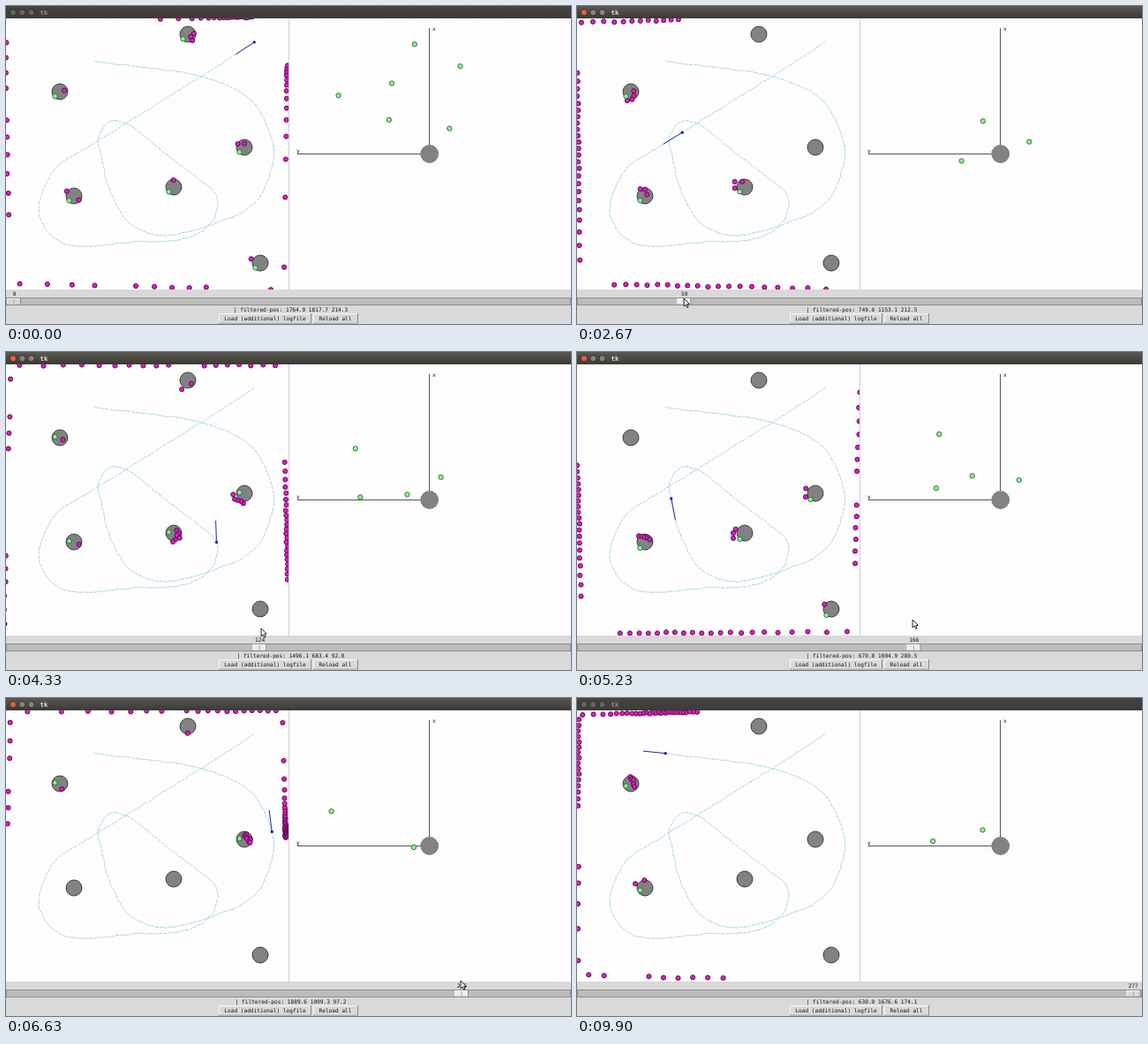
Recreate the animation shown at these times as an HTML page with a canvas. Size 640x360 px, loop 9.93 s.

```html
<!DOCTYPE html>
<html lang="en">
<head>
<meta charset="utf-8">
<title>tk</title>
<style>
  html, body { margin: 0; width: 640px; height: 360px; overflow: hidden; background: #d9d9d9; }
  canvas { display: block; }
</style>
</head>
<body>
<canvas id="stage" width="640" height="360"></canvas>
<script>
const ctx = document.getElementById('stage').getContext('2d');
const LOOP = 9930;
const MONO = '"DejaVu Sans Mono", "Liberation Mono", monospace';
const PANEL = '#d9d9d9', STONE = '#828282', INK = '#111';

// Pixels per millimetre in the world view; the robot view has its own
const SX = 0.1596, SY = 0.1538;
const toX = mm => mm * SX - 0.3, toY = mm => 320.5 - mm * SY;

// Known poses (time, step, x mm, y mm, heading) and pixels passed on the way to the next
const legs = [
  { at: 1500, step: 0, pose: [1764, 1817.7, 214.3], via: [[222, 79]] },
  { at: 2670, step: 50, pose: [749, 1153.1, 212.5], via: [[92, 160], [55, 185], [37, 231], [56, 264], [90, 272],
    [145, 267], [200, 264], [232, 246]] },
  { at: 4330, step: 124, pose: [1496.1, 683.4, 92], via: [[213, 192], [178, 165], [143, 137], [119, 130], [105, 148]] },
  { at: 5230, step: 166, pose: [670.8, 1004.9, 280.5], via: [[119, 212], [142, 247], [180, 260], [234, 247],
    [279, 226], [299, 190]] },
  { at: 6630, step: 226, pose: [1889.6, 1099.3, 97.2], via: [[276, 105], [222, 80], [160, 70]] },
  { at: 8000, step: 277, pose: [630, 1676.6, 174.1], via: [] }
];
const pillars = [[206, 32], [61, 97], [270, 160], [77, 215], [190, 205], [288, 291]];
const pointerKeys = [[60, 645, 356], [1150, 9, 333], [1500, 9, 333], [2670, 121, 331], [5230, 380, 303],
  [6630, 515, 320], [8900, 628, 317], [9300, 270, 136], [9530, 95, 192], [9870, 95, 192]];

const mix = (a, b, u) => a + (b - a) * u;
const clamp = (v, lo, hi) => Math.min(hi, Math.max(lo, v));
const noise = (a, b) => { const s = Math.sin(a * 12.9898 + b * 78.233) * 43758.5453; return (s - Math.floor(s)) * 2 - 1; };
const blend = (a, b, u) => a.map((v, n) => mix(v, b[n], u));
const rad = deg => deg * Math.PI / 180;

// Interval of a rising list that holds v, and how far through it
function locate(list, v) {
  let k = 0;
  while (k < list.length - 2 && v >= list[k + 1]) k++;
  return { k, u: clamp((v - list[k]) / (list[k + 1] - list[k]), 0, 1) };
}
const times = legs.map(l => l.at), steps = legs.map(l => l.step);

function stepAt(t) {
  const { k, u } = locate(times, t);
  return Math.round(mix(steps[k], steps[k + 1], u));
}

// Smooth track through all points, with running length
const knots = [], legKnot = [];
for (const { pose, via } of legs) {
  legKnot.push(knots.length);
  knots.push([toX(pose[0]), toY(pose[1])], ...via);
}
const FINE = 12, track = [];
for (let n = 0; n <= (knots.length - 1) * FINE; n++) {
  const k = Math.min(Math.floor(n / FINE), knots.length - 2), u = n / FINE - k;
  const [p, q, r, s] = [-1, 0, 1, 2].map(d => knots[clamp(k + d, 0, knots.length - 1)]);
  track.push([0, 1].map(c => q[c] + 0.5 * u * (r[c] - p[c] +
    u * (2 * p[c] - 5 * q[c] + 4 * r[c] - s[c] + u * (3 * (q[c] - r[c]) + s[c] - p[c])))));
}
const run = [0];
for (let n = 1; n < track.length; n++)
  run.push(run[n - 1] + Math.hypot(track[n][0] - track[n - 1][0], track[n][1] - track[n - 1][1]));

function along(d) {
  const { k, u } = locate(run, d);
  return blend(track[k], track[k + 1], u);
}
const legStart = k => run[legKnot[k] * FINE];
function tangent(d) {
  const a = along(d - 2), b = along(d + 2);
  return Math.atan2((a[1] - b[1]) / SY, (b[0] - a[0]) / SX) * 180 / Math.PI;
}
const wrap = a => ((a + 180) % 360 + 360) % 360 - 180;
const headErr = legs.map((l, k) => wrap(l.pose[2] - tangent(legStart(k))));

function poseAt(step) {
  const { k, u } = locate(steps, step);
  const d = mix(legStart(k), legStart(k + 1), u), [x, y] = along(d);
  const heading = (tangent(d) + mix(headErr[k], headErr[k + 1], u) + 720) % 360;
  return { x, y, heading, cos: Math.cos(rad(heading)), sin: Math.sin(rad(heading)) };
}
const trail = Array.from({ length: 278 }, (_, i) => {
  const { x, y } = poseAt(i);
  return [x + noise(i, 1) * 0.6, y + noise(i, 2) * 0.6];
});

// Distance along a ray to the walls, which seem to lean in towards the heading
function wallDistance({ x, y, cos, sin }, dx, dy) {
  const tilt = 8 / 310;
  const upright = (mid, slope) => (mid + slope * (y - 166) - x) / (dx - slope * dy);
  const level = (mid, slope) => (mid + slope * (x - 160) - y) / (dy - slope * dx);
  const all = [upright(1.5, -tilt * sin), upright(317, tilt * sin), level(15, tilt * cos), level(317.5, -tilt * cos)];
  return Math.min(...all.filter(t => t > 0));
}

// Cast the scanner's rays; a pillar is recognised when it stands clear of the wall behind
function scan(step, pose) {
  const hits = [], seen = new Set();
  for (let r = -34; r <= 30; r++) {
    const a = rad(pose.heading + (r + 0.5) * 3.6);
    const len = Math.hypot(Math.cos(a) * SX, Math.sin(a) * SY);
    const dx = Math.cos(a) * SX / len, dy = -Math.sin(a) * SY / len;
    const wall = wallDistance(pose, dx, dy);
    let best = wall, hit = -1, clear = false;
    pillars.forEach(([px, py], n) => {
      const mx = px - pose.x, my = py - pose.y;
      const ahead = mx * dx + my * dy, off = mx * dy - my * dx;
      const t = ahead - Math.sqrt(81 - off * off);
      if (t > 0 && t < best) { best = t; hit = n; clear = wall - ahead > 24; }
    });
    const onPillar = hit >= 0;
    if (clear) seen.add(hit);
    const far = best + noise(r, step) * (onPillar ? 2.5 : 0.8);
    hits.push([pose.x + dx * far - (onPillar ? 4 : 0), pose.y + dy * far + (onPillar ? 2 : 0)]);
  }
  // Estimates sit a little left of the pillars and trail with the heading
  const found = [...seen].map(n => [pillars[n][0] - 5.5, pillars[n][1] + 3 - 4 * pose.sin]);
  return { hits, found };
}

function box(x, y, w, h, fill) { ctx.fillStyle = fill; ctx.fillRect(x, y, w, h); }
function disc(x, y, r, fill, edge) {
  ctx.beginPath();
  ctx.arc(x, y, r, 0, Math.PI * 2);
  ctx.fillStyle = fill;
  ctx.fill();
  if (edge) { ctx.lineWidth = 0.9; ctx.strokeStyle = edge; ctx.stroke(); }
}
const echo = ([x, y]) => disc(x, y, 2.6, '#dc20c0', '#4c0a42');
const marker = ([x, y]) => disc(x, y, 2.7, '#90ee90', '#2b6a3a');
function line(points, color, dash = []) {
  ctx.beginPath();
  points.forEach(p => ctx.lineTo(...p));
  ctx.setLineDash(dash);
  ctx.lineWidth = 1;
  ctx.strokeStyle = color;
  ctx.stroke();
  ctx.setLineDash([]);
}
function text(s, x, y, align = 'center', color = INK, font = '6.15px ' + MONO) {
  ctx.font = font;
  ctx.textAlign = align;
  ctx.fillStyle = color;
  ctx.fillText(s, x, y);
}
function raised(x, y, w, h, fill) {
  box(x, y, w, h, '#8a8a8a');
  box(x, y, w - 1, h - 1, '#f6f6f6');
  box(x + 1, y + 1, w - 2, h - 2, fill);
}

function titleBar(focused) {
  const g = ctx.createLinearGradient(0, 0, 0, 14);
  g.addColorStop(0, focused ? '#5b5851' : '#454440');
  g.addColorStop(1, focused ? '#3a3934' : '#3c3b37');
  box(0, 0, 640, 14, g);
  const plain = focused ? '#85827a' : '#66645e';
  [focused ? '#ea5f3a' : plain, plain, plain].forEach((c, n) => disc(8 + n * 10.3, 7.3, 3.6, c, '#2e2d2a'));
  text('tk', 38.5, 10, 'left', focused ? '#e4e0d8' : '#8c8a84', 'bold 7.4px ' + MONO);
}

function worldView(pose, { hits, found }) {
  ctx.save();
  ctx.beginPath();
  ctx.rect(0, 14, 320, 307);
  ctx.clip();
  line(trail, '#a9d3f6', [4, 1]);
  line(trail, '#b4e6c4', [2, 8]);
  pillars.forEach(([x, y]) => disc(x, y, 9, STONE, '#303030'));
  hits.forEach(echo);
  found.forEach(marker);
  line([[pose.x, pose.y], [pose.x + 160 * SX * pose.cos, pose.y - 160 * SY * pose.sin]], '#2a2a90');
  disc(pose.x, pose.y, 1.6, '#1414cc');
  ctx.restore();
}

function robotView({ x, y, cos, sin }, { found }) {
  line([[479.5, 25], [479.5, 167]], '#555');
  line([[330, 167.5], [479, 167.5]], '#555');
  text('x', 483, 27.5, 'left');
  text('y', 329, 165.5, 'left');
  disc(479.7, 167.5, 10.4, STONE);
  found.forEach(([px, py]) => {
    const dx = (px - x) / SX, dy = (y - py) / SY;
    const ahead = dx * cos + dy * sin, left = dy * cos - dx * sin;
    marker([479.5 - left * 0.0748, 167.5 - ahead * 0.0713]);
  });
}

function controls(step, pose, active) {
  box(0, 321, 640, 39, PANEL);
  const x = 9 + step * 2.243;
  text(step, Math.min(x + 0.5, 630), 328.3);
  box(0, 330, 640, 9, '#8f8f8f');
  box(1, 331, 638, 7, '#bcbcbc');
  raised(x - 8, 331, 16, 7.5, active ? '#ececec' : PANEL);
  box(x - 0.5, 332, 1, 5.5, '#aaa');
  const values = [(pose.x + 0.3) / SX, (320.5 - pose.y) / SY, pose.heading];
  text('| filtered-pos: ' + values.map(v => v.toFixed(1)).join(' '), 322.5, 345.6);
  raised(241, 348, 105, 11.5, PANEL);
  raised(348, 348, 51, 11.5, PANEL);
  text('Load (additional) logfile', 293.5, 355.8);
  text('Reload all', 373, 355.8);
}

function pointer(t) {
  const { k, u } = locate(pointerKeys.map(p => p[0]), t);
  const [, x, y] = blend(pointerKeys[k], pointerKeys[k + 1], u);
  ctx.save();
  ctx.translate(x, y);
  const arrow = new Path2D('M0 0V9L2.1 7.2 3.6 10.4 5 9.7 3.6 6.6 6.2 6.3Z');
  ctx.fillStyle = '#fafafa';
  ctx.fill(arrow);
  ctx.lineWidth = 0.9;
  ctx.strokeStyle = INK;
  ctx.stroke(arrow);
  ctx.restore();
}

function draw(t) {
  const step = stepAt(t), pose = poseAt(step), view = scan(step, pose);
  box(0, 14, 640, 307, '#fdfdfd');
  line([[320.5, 14], [320.5, 321]], '#cfcfdc');
  worldView(pose, view);
  robotView(pose, view);
  controls(step, pose, t > 1150 && t < 8900);
  titleBar(t >= 1030 && t < 9870);
  if (t >= 60 && t < 9870) pointer(t);
}

const start = performance.now();
function tick() {
  draw((performance.now() - start) % LOOP);
  requestAnimationFrame(tick);
}
tick();
</script>
</body>
</html>
```
